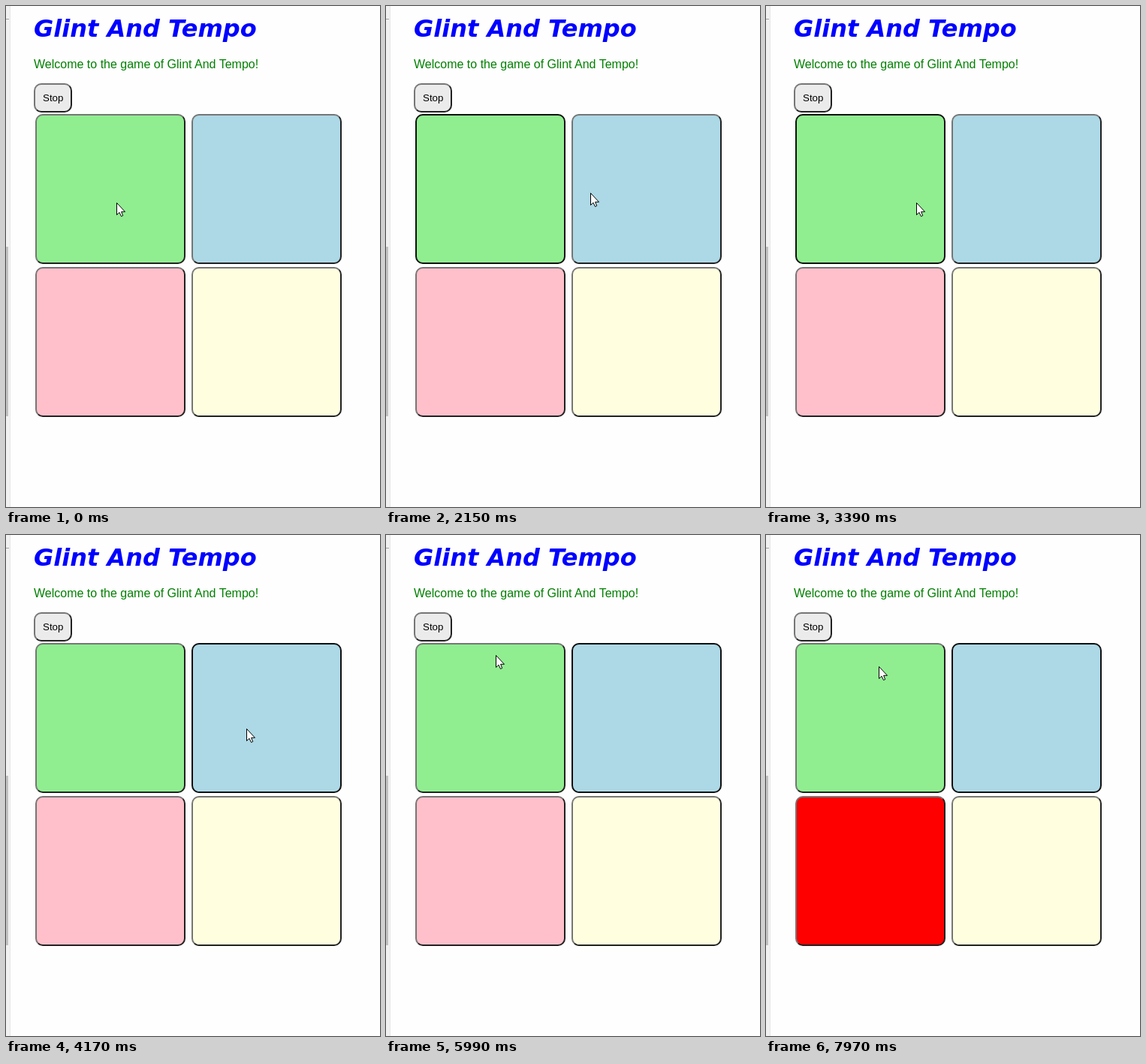
Write an HTML page that moves like this. It is 498 by 668 pixels and loops after 8000 ms.

```html
<!DOCTYPE html>
<html lang="en">
<head>
<meta charset="utf-8">
<title>Glint And Tempo</title>
<style>
  html, body { margin: 0; width: 100%; height: 100%; overflow: hidden; background: #fefefe; }
  body > * { position: absolute; box-sizing: border-box; }
  .strip { left: 0; top: 0; width: 6px; height: 668px; background: #f1f1f1; border-right: 1px solid #e6e6e6; }
  .thumb { left: 0; top: 321px; width: 3px; height: 226px; background: #c1c1c1; }
  .notch { left: 0; top: 17px; width: 4px; height: 1px; background: #a0a0a0; }
  .key {
    border: 2px solid; border-color: #767676 #212121 #212121 #767676;
    border-radius: 10px;
  }
  .pad { width: 200px; height: 200px; }
  .pad.focus { border-color: #101010; }
  .pad.focus::after {
    content: ""; position: absolute; inset: -2px; z-index: -1;
    background: #333; border-radius: 4px;
  }
  #stop { left: 37px; top: 103px; width: 51px; height: 39px; background: #ebebeb; }
  svg { left: 0; top: 0; overflow: visible; }
  .head { font: italic bold 32px "DejaVu Sans", sans-serif; fill: #00f; }
  .note { font: 16px "Liberation Sans", Arial, sans-serif; fill: green; }
  .label { font: 13.333px "Liberation Sans", Arial, sans-serif; }
</style>
</head>
<body>
<div class="strip"></div>
<div class="thumb"></div>
<div class="notch"></div>
<div class="key" id="stop"></div>
<svg width="498" height="668">
  <text class="head" x="37" y="41">Glint And Tempo</text>
  <text class="note" x="37" y="83">Welcome to the game of Glint And Tempo!</text>
  <text class="label" x="49" y="127">Stop</text>
</svg>
<script>
const LOOP = 8000;
const FRAME = 130;  // the pointer is redrawn at this pace
const HOLD = 980;   // how long a clue stays lit
const STRIDE = 1300;
const PRESS = 130;

const COLORS = [
  ["lightgreen", "green"], ["lightblue", "blue"],
  ["pink", "red"], ["lightyellow", "yellow"]
];

// Each round lights its pads in order, starting with the first.
const ROUNDS = [{ at: 1090, length: 2 }, { at: 4900, length: 3 }];
const CLICKS = [{ at: 150, pad: 0 }, { at: 3780, pad: 0 }, { at: 4020, pad: 1 }];
const BUSY = { at: 1340, hold: 120 };

const HOME = { x: 147, y: 262 };
const MOVES = [
  { from: 270, to: 540, x: 272, y: 249 },
  { from: 2150, to: 2840, x: 251, y: 257 },
  { from: 3220, to: 3630, x: 170, y: 265 },
  { from: 3780, to: 4020, x: 320, y: 258 },
  { from: 4170, to: 4590, x: 255, y: 244 },
  { from: 4900, to: 5320, x: 137, y: 138 },
  { from: 5405, to: 6500, x: 148, y: 167 },
  { from: 7720, to: 7930, x: 150, y: 175 }
];

const pads = COLORS.map((_, i) => {
  const el = document.createElement("div");
  el.className = "key pad";
  el.style.left = 39 + 208 * (i % 2) + "px";
  el.style.top = 144 + 204 * Math.floor(i / 2) + "px";
  document.body.append(el);
  return el;
});

document.body.insertAdjacentHTML("beforeend", `
  <svg id="pointer" width="24" height="24">
    <path d="M.5 .5V16.5L4 13.2L6.5 18.5L8.7 17.5L6.6 12.3H11.5Z"
      fill="#fff" stroke="#000" stroke-linejoin="round"/>
    <circle id="ring" cx="14.5" cy=".5" r="6.5" fill="none" stroke="#2a8fd8" stroke-width="3"/>
  </svg>`);
const pointer = document.getElementById("pointer");
const ring = document.getElementById("ring");

const during = (t, at, hold) => t >= at && t < at + hold;
const easeOut = u => 1 - (1 - u) ** 2;

function isLit(pad, t) {
  return ROUNDS.some(r => pad < r.length && during(t, r.at + pad * STRIDE, HOLD)) ||
    CLICKS.some(c => c.pad === pad && during(t, c.at, PRESS));
}

function pointerAt(t) {
  let { x, y } = HOME;
  for (const m of MOVES) {
    const u = easeOut(Math.min(1, Math.max(0, (t - m.from) / (m.to - m.from))));
    x += (m.x - x) * u;
    y += (m.y - y) * u;
  }
  return [Math.round(x), Math.round(y)];
}

function draw(t) {
  const focused = CLICKS.findLast(c => c.at <= t)?.pad;
  pads.forEach((el, i) => {
    el.style.background = COLORS[i][Number(isLit(i, t))];
    el.classList.toggle("focus", i === focused);
  });
  const [x, y] = pointerAt(Math.floor(t / FRAME) * FRAME);
  pointer.style.transform = `translate(${x}px, ${y}px)`;
  ring.style.display = during(t, BUSY.at, BUSY.hold) ? "" : "none";
}

const start = performance.now();
function tick() {
  draw((performance.now() - start) % LOOP);
  requestAnimationFrame(tick);
}
tick();
</script>
</body>
</html>
```
